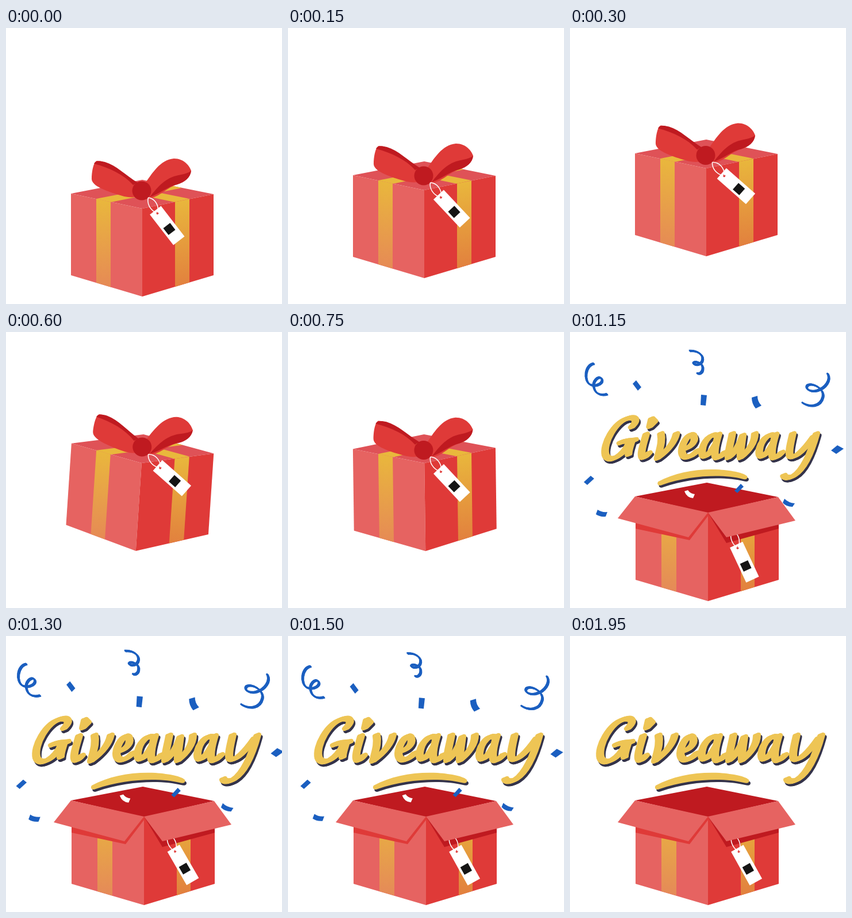
Animation, 480 px wide and 480 px high, one loop 2000 ms. Source, as an HTML page with a canvas:

```html
<!DOCTYPE html>
<html lang="en">
<head>
<meta charset="utf-8">
<title>Giveaway</title>
<style>
html, body { margin: 0; width: 100%; height: 100%; overflow: hidden; background: #fff; }
canvas { display: block; width: 480px; height: 480px; }
</style>
</head>
<body>
<canvas id="stage" width="480" height="480" role="img" aria-label="Giveaway"></canvas>
<script>
const ctx = document.getElementById('stage').getContext('2d');
const LOOP = 2000, STEP = 50, OPEN_AT = 1000;
const PINK = '#e66361', RED = '#df3a38', DARK = '#bf1a20', TOP = '#df5257';
const GOLD = '#e9b83c', BLUE = '#1b5fc0', YELLOW = '#eec555', INK = '#34334a';

// Keyframes: [time, value] pairs, linear in between
const lift = [[0, 0], [100, -18], [200, -46], [300, -70], [400, -82], [500, -86],
  [750, -86], [800, -82], [900, -56], [950, -30], [1000, 0]];
const tilt = [[350, 0], [500, -7.5], [600, 3.8], [700, -3], [800, 1.5], [900, 0]];
const bowLag = [[0, 0], [150, 6], [300, 8.5], [600, 3], [900, 14], [1000, 6]];
const swing = [[0, 52.3], [300, 41.4], [600, 41.4], [900, 52.3], [1150, 65], [1300, 60], [1500, 61]];
const wordSize = [[1000, .2], [1050, .65], [1100, .87], [1150, .955], [1200, .985], [1300, 1]];
const burst = [[1000, .35], [1050, .85], [1100, 1], [1150, 1], [1300, 1.03], [1500, 1.011], [1650, 1.005]];
const fade = [[1650, 1], [1900, 0]];

function at(keys, t) {
  if (t <= keys[0][0]) return keys[0][1];
  for (let i = 1; i < keys.length; i++) {
    const [t0, a] = keys[i - 1], [t1, b] = keys[i];
    if (t <= t1) return a + (b - a) * (t - t0) / (t1 - t0);
  }
  return keys[keys.length - 1][1];
}

const rad = deg => deg * Math.PI / 180;

function group(draw) {
  ctx.save();
  draw();
  ctx.restore();
}

function scaled(x, y, s, draw) {
  group(() => {
    ctx.translate(x, y);
    ctx.scale(s, s);
    ctx.translate(-x, -y);
    draw();
  });
}

function shape(d, color) {
  ctx.fillStyle = color;
  ctx.fill(new Path2D(d));
}

function line(d, color, width) {
  ctx.strokeStyle = color;
  ctx.lineWidth = width;
  ctx.stroke(new Path2D(d));
}

// Broad nib: one stroke swept along a short slanted line
function nib(d, color, width, sweep, slope) {
  for (let n = -sweep; n <= sweep; n += sweep / 3) {
    group(() => {
      ctx.translate(n, n * slope);
      line(d, color, width);
    });
  }
}

function dot(x, y, r, color) {
  ctx.fillStyle = color;
  ctx.beginPath();
  ctx.arc(x, y, r, 0, 7);
  ctx.fill();
}

function ribbonFill(end) {
  const g = ctx.createLinearGradient(0, 295, 0, 450);
  g.addColorStop(0, GOLD);
  g.addColorStop(1, end);
  return g;
}

function drawTag(x, y, angle) {
  group(() => {
    ctx.translate(x, y);
    ctx.rotate(rad(angle));
    ctx.fillStyle = '#fff';
    ctx.fillRect(25, -8.5, 67, 24.5);
    dot(31, 4, 2.2, RED);
    line('M0,0 C8,-8 22,-7 31,3 M0,0 C6,8 18,11 30,5', '#fff', 1.5);
    ctx.fillStyle = '#151515';
    ctx.fillRect(58, -3, 15, 15);
  });
}

function drawBow() {
  // left loop
  shape('M236,290 L224,272 C202,256 188,233 158,231 C152,233 149,250 149,263 C150,275 174,283 192,289 C208,294 222,298 236,290 Z', RED);
  shape('M153,236 C156,230 164,231 172,233 C192,239 208,256 229,269 L221,273 C205,255 180,243 153,236 Z', DARK);
  // right loop
  shape('M240,273 C254,253 268,229 292,227 C310,227 319,240 322,248 C321,260 311,268 298,272 C280,277 268,294 247,297 Z', RED);
  shape('M322,248 C321,260 311,268 298,272 C280,276 268,288 250,294 C264,276 278,260 300,256 C310,254 318,252 322,248 Z', DARK);
  dot(236, 283, 16.5, DARK);
}

function drawClosed(t) {
  const angle = at(tilt, t);
  group(() => {
    ctx.translate(237, 297 + at(lift, t));
    ctx.rotate(rad(angle));
    ctx.translate(-237, -297);
    shape('M113,288 L237,264 L361,289 L237,314 Z', TOP);
    shape('M157,297 L281,273 L306,278 L182,303 Z', GOLD);
    shape('M294,303 L170,277 L195,272 L319,297 Z', GOLD);
    shape('M113,288 L237,314 V467 L113,430 Z', PINK);
    shape('M237,314 L361,289 V430 L237,467 Z', RED);
    shape('M157,297 L182,302.5 V450.5 L157,443 Z', ribbonFill('#e68a55'));
    shape('M294,302.5 L319,297.5 V442.5 L294,450 Z', ribbonFill('#e2803e'));
    ctx.translate(0, at(bowLag, t));
    drawBow();
    drawTag(247.5, 295, at(swing, t) - angle);
  });
}

function drawOpen(t) {
  shape('M113,286 L238,262 L362,287 L240,315 Z', DARK);
  shape('M114,320 L240,314 V468 L114,431 Z', PINK);
  shape('M240,314 L363,320 V431 L240,468 Z', RED);
  shape('M159,335 H185 V451.5 L159,444 Z', ribbonFill('#e58a58'));
  shape('M297,335 H321 V443.5 L297,451 Z', ribbonFill('#e2803e'));
  shape('M114,325 V342 L208,362 L240,320 V314 Z', RED);
  shape('M240,314 L272,367 L363,342 V325 Z', DARK);
  drawTag(282, 345.6, at(swing, t));
  shape('M113,286 L240,314 L206,357 L83,324 Z', PINK);
  shape('M240,314 L362,287 L392,328 L272,357 Z', PINK);
}

const letterA = 'M257,177 C247,169 231,186 229,204 C228,220 240,216 254,191 M259,174 C252,196 250,213 255,216 C260,217 265,212 270,207';
const letters = [
  ['M101,160 C114,147 106,141 93,145 C70,152 48,190 53,211 C59,229 88,211 97,187 M80,189 C90,184 100,186 107,184 M101,186 C98,196 95,204 95,210'],
  ['M127,174 C122,192 116,208 120,215 C123,217 128,213 132,208 M137,146 L142,151 L134,159 Z'],
  ['M154,173 C157,188 151,202 148,217 C163,206 178,190 182,173'],
  ['M197,200 C209,197 219,186 213,176 C206,169 193,188 192,203 C192,220 207,218 220,204'],
  [letterA],
  ['M284,173 C281,190 276,204 277,216 C288,208 298,192 303,176 C301,192 298,206 299,216 C312,206 325,190 325,173'],
  [letterA, 104],
  ['M394,173 C390,190 386,206 389,213 C398,220 418,198 432,178 M437,173 C428,206 414,238 396,249 C386,255 379,252 378,249']
];

function lettering(color) {
  for (const [d, dx = 0] of letters) {
    group(() => {
      ctx.translate(dx, 0);
      nib(d, color, 7.5, 3.3, -.4);
    });
  }
  shape('M149,260 C180,243 220,236 260,238 C285,240 305,244 311,250 C313,255 308,257 302,255 C270,247 210,247 156,266 C149,269 146,264 149,260 Z', color);
}

function drawWord(t) {
  scaled(246, 265, at(wordSize, t), () => {
    ctx.lineCap = ctx.lineJoin = 'round';
    group(() => {
      ctx.translate(2.5, 4);
      lettering(INK);
    });
    lettering(YELLOW);
  });
}

const streamers = [
  'M42,55 C26,57 23,86 36,92 C47,96 60,88 55,81 C50,75 38,86 42,98 C45,109 56,111 65,108',
  'M208,33 C222,32 234,40 230,51 C226,59 214,58 215,54 C219,49 232,55 231,64 C231,70 226,74 221,72',
  'M448,72 C455,84 444,98 430,102 C418,105 408,99 413,93 C422,87 443,99 440,113 C436,130 418,132 404,123'
];
const scraps = [
  'M109,90 L115,84 L124,96 L118,102 Z',
  'M228,109 L238,110 L236,128 L227,127 Z',
  'M316,114 L326,111 Q326,121 333,128 L323,133 Q316,125 316,114 Z',
  'M454,206 L465,197 L476,203 L463,212 Z',
  'M24,261 L36,250 L42,255 L30,266 Z',
  'M48,309 Q55,314 65,313 L62,321 Q52,322 45,317 Z',
  'M373,290 Q380,297 391,298 L387,304 Q376,304 370,297 Z',
  'M286,276 L297,264 L302,269 L291,280 Z'
];

function drawConfetti(t) {
  scaled(240, 262, at(burst, t), () => {
    ctx.globalAlpha = at(fade, t);
    streamers.forEach(d => nib(d, BLUE, 2.5, 1.2, .8));
    scraps.forEach(d => shape(d, BLUE));
    shape('M199,277 L205,275 Q209,281 217,282 L214,289 Q203,288 199,277 Z', '#fff');
  });
}

function frame(now) {
  const t = Math.floor(now % LOOP / STEP) * STEP;
  ctx.fillStyle = '#fff';
  ctx.fillRect(0, 0, 480, 480);
  if (t < OPEN_AT) {
    drawClosed(t);
  } else {
    drawOpen(t);
    drawWord(t);
    drawConfetti(t);
  }
}

const start = performance.now();
function tick() {
  frame(performance.now() - start);
  requestAnimationFrame(tick);
}
tick();
</script>
</body>
</html>
```
